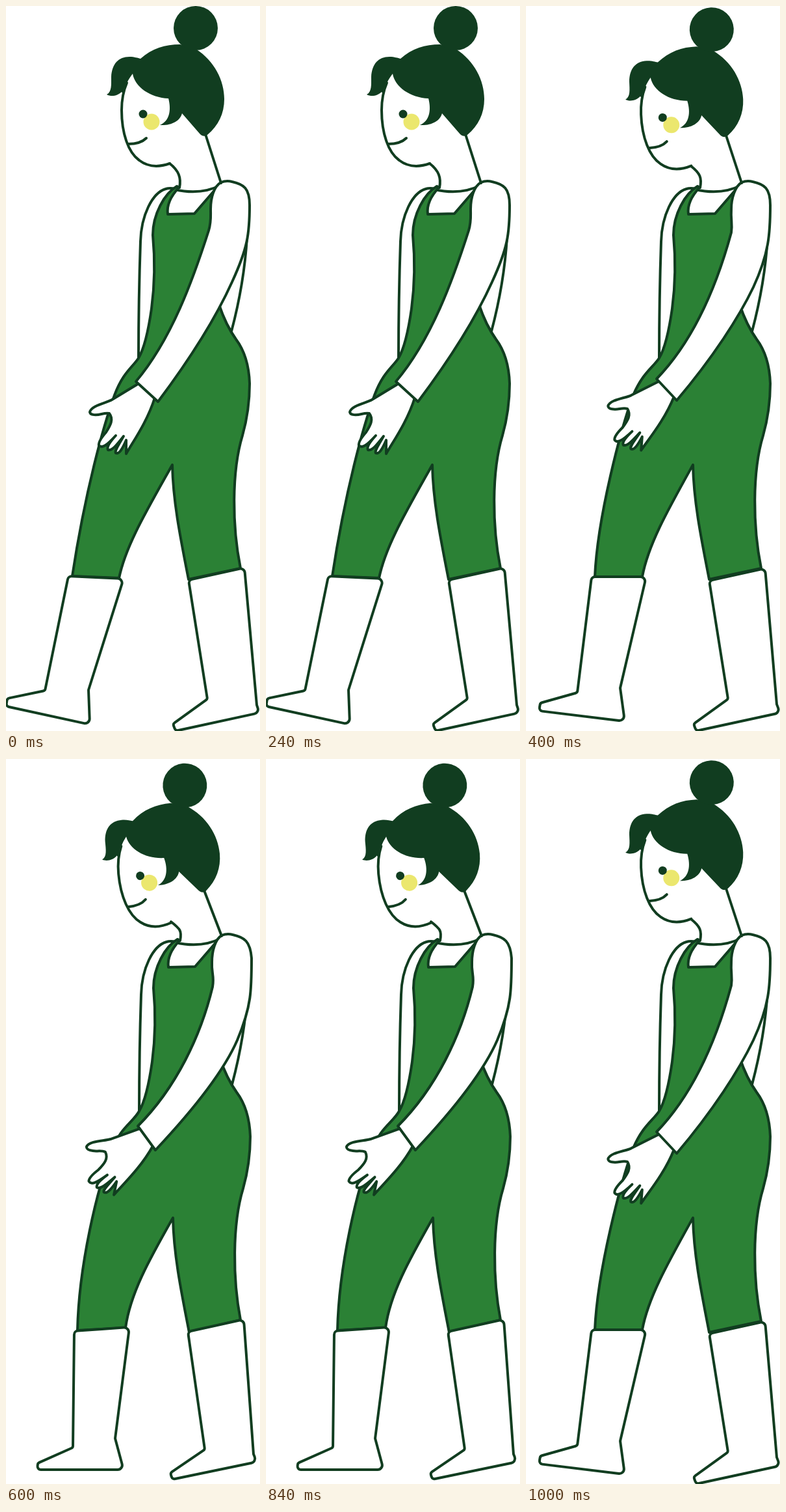
Recreate the animation shown at these times as an HTML page with a canvas. Size 391x1114 px, loop 1200 ms.

```html
<!DOCTYPE html>
<html lang="en">
<head>
<meta charset="utf-8">
<title>Walking woman</title>
<style>
html, body { margin: 0; width: 100%; height: 100%; overflow: hidden; background: #fff; }
canvas { display: block; width: 391px; height: 1114px; }
</style>
</head>
<body>
<canvas id="stage" width="391" height="1114"></canvas>
<script>
const ctx = document.getElementById('stage').getContext('2d');
const DARK = '#113d20', GREEN = '#2b8135', YELLOW = '#ebe76e', WHITE = '#fff';
const LOOP = 1200;

// step: leg forward, mid: halfway back, rest: leg closest
const step = {
  sway: 0,
  head: { x: 342, y: 186, turn: 0 },
  chin: [252, 242], nape: [307, 197],
  hand: { x: 217, y: 592, turn: 0 },
  arm: 'C320 277 315 295 315 312 C315 325 316 332 312 345 C288 420 255 512 200 577 ' +
       'L234 608 C285 540 325 475 348 424 C372 372 375 350 375 306',
  thigh: 'C195 555 180 563 167 598 C150 645 122 745 102 876 L174 879 C184 830 215 778 256 705',
  shin: 'L361 864',
  frontBoot: [[96, 876], [181, 880], [127, 1051], [129, 1104], [0, 1076], [2, 1064], [60, 1052]],
  backBoot: [[281, 882], [367, 863], [386, 1074], [390, 1086], [261, 1114], [257, 1103], [310, 1065]]
};
const mid = {
  sway: 1,
  head: { x: 342, y: 186, turn: -0.041 },
  chin: [254, 246], nape: [308, 199],
  hand: { x: 216.5, y: 589.5, turn: 0.077 },
  arm: 'C322 277 316 295 316 312 C315 330 318 333 316 348 C295 425 260 512 201 573 ' +
       'L232 606 C288 540 328 478 350 432 C374 380 376 350 376 306',
  thigh: 'C195 555 179 563 164 598 C145 650 109 785 105 877 L178 877 C187 828 217 775 256 705',
  shin: 'L361 864',
  frontBoot: [[101, 877], [185, 877], [145, 1048], [152, 1099], [20, 1083], [22, 1071], [79, 1055]],
  backBoot: [[282, 883], [368, 864], [386, 1073], [391, 1086], [262, 1114], [258, 1103], [311, 1065]]
};
const rest = {
  sway: 1,
  head: { x: 358, y: 222, turn: -0.09 },
  chin: [254, 250], nape: [305, 202],
  hand: { x: 216.5, y: 582, turn: 0.2 },
  arm: 'C322 277 317 295 317 312 C316 330 321 333 318 350 C300 425 262 505 203 564 ' +
       'L230 601 C295 532 336 478 356 432 C378 380 378 355 378 306',
  thigh: 'C195 558 174 567 163 600 C139 660 111 780 109 878 L183 874 C190 822 219 770 256 705',
  shin: 'L360 862',
  frontBoot: [[105, 879], [190, 873], [168, 1044], [181, 1092], [48, 1092], [49, 1082], [103, 1058]],
  backBoot: [[280, 880], [366, 861], [381, 1068], [386, 1080], [256, 1107], [253, 1097], [306, 1061]]
};

const HAIR = new Path2D('M155 136 C163 132 162 121 162 109 C163 89 173 78 190 78 ' +
  'C198 78 203 80 207 81 C225 65 245 59 268 59 L292 66 C321 84 336 115 336 143 ' +
  'C336 165 327 184 310 198 C306 201 301 200 298 196 L271 165 C268 177 254 184 237 183 ' +
  'C251 177 255 161 250 142 C222 141 198 124 195 104 C188 113 183 123 180 135 L178 132 C172 138 162 140 155 136 Z');
const FACE = 'M186 118 C180 132 178 145 178 160 C178 195 188 225 205 237 C218 247 235 248 252 242';
const SMILE = 'M188 212 C200 212 210 209 216 203';
const HAND = 'M206 579 L163 605 C154 610 131 614 129 624 C130 629 139 629 147 627 ' +
  'C151 626 155 625 159 626 C166 635 161 644 154 655 C147 663 142 670 143 675 ' +
  'C148 681 156 674 169 660 C158 672 155 678 157 682 C163 684 170 675 181 661 ' +
  'C172 677 167 683 169 687 C174 689 179 681 185 667 L185 688 C195 670 217 640 229 602';

function shape(path, fill) {
  const p = typeof path === 'string' ? new Path2D(path) : path;
  if (fill) {
    ctx.fillStyle = fill;
    ctx.fill(p);
  }
  ctx.stroke(p);
}

function dot(x, y, r, color) {
  ctx.fillStyle = color;
  ctx.beginPath();
  ctx.arc(x, y, r, 0, Math.PI * 2);
  ctx.fill();
}

function boot(pts) {
  const radii = [6, 7, 3, 7, 5, 4.5, 4];
  const p = new Path2D();
  p.moveTo((pts[0][0] + pts[1][0]) / 2, (pts[0][1] + pts[1][1]) / 2);
  for (let i = 1; i <= pts.length; i++) {
    const a = pts[i % pts.length], b = pts[(i + 1) % pts.length];
    p.arcTo(a[0], a[1], b[0], b[1], radii[i % pts.length]);
  }
  p.closePath();
  shape(p, WHITE);
}

function drawBody(pose) {
  ctx.save();
  ctx.translate(pose.sway, 0);
  shape('M262 281 C256 280 252 279 246 281 C225 287 208 322 207 362 C205 420 204 480 204 541');
  shape('M371 355 C368 405 359 455 347 500');
  shape('M260 282 C282 287 308 287 331 275');
  shape('M263 277 C244 288 226 320 226 352 C230 395 228 435 224 465 C219 500 213 526 204 541 ' +
    pose.thigh + 'C257 760 268 815 281 881' + pose.shin +
    'C348 800 347 716 364 660 C373 628 375 604 375 580 C374 550 366 528 354 512 ' +
    'C344 498 335 480 328 459 L325 350 L325 281 L322 282 L290 319 L249 320 C247 306 254 292 266 279 Z', GREEN);
  ctx.restore();
}

function drawArm(pose) {
  const h = pose.hand, x = 331 + pose.sway;
  ctx.save();
  ctx.translate(h.x, h.y);
  ctx.rotate(h.turn);
  ctx.translate(-217, -592);
  shape(HAND, WHITE);
  ctx.restore();
  shape(`M${x} 271 ${pose.arm} C${x + 44} 280 ${x + 35} 274 ${x + 17} 270 C${x + 9} 268 ${x + 5} 269 ${x} 271 Z`, WHITE);
}

function drawHead(pose) {
  const [cx, cy] = pose.chin, [nx, ny] = pose.nape, h = pose.head;
  shape(`M${cx} ${cy} C${cx + 14} ${cy + 11} ${270 + pose.sway} 264 ${267 + pose.sway} 279`);
  shape(`M${nx} ${ny} L${331 + pose.sway} 272`);
  ctx.save();
  ctx.translate(h.x, h.y);
  ctx.rotate(h.turn);
  ctx.translate(-h.x, -h.y);
  shape(FACE);
  ctx.fillStyle = DARK;
  ctx.fill(HAIR);
  dot(292, 34, 34, DARK);
  dot(224, 178, 12.5, YELLOW);
  dot(211, 166, 6.5, DARK);
  shape(SMILE);
  ctx.restore();
}

function draw(pose) {
  ctx.fillStyle = WHITE;
  ctx.fillRect(0, 0, 391, 1114);
  ctx.strokeStyle = DARK;
  ctx.lineWidth = 4;
  ctx.lineCap = ctx.lineJoin = 'round';
  drawBody(pose);
  drawArm(pose);
  boot(pose.frontBoot);
  boot(pose.backBoot);
  drawHead(pose);
}

function poseAt(t) {
  if (t < 400) return step;
  if (t >= 600 && t < 1000) return rest;
  return mid;
}

function tick() {
  draw(poseAt(performance.now() % LOOP));
  requestAnimationFrame(tick);
}
tick();
</script>
</body>
</html>
```
